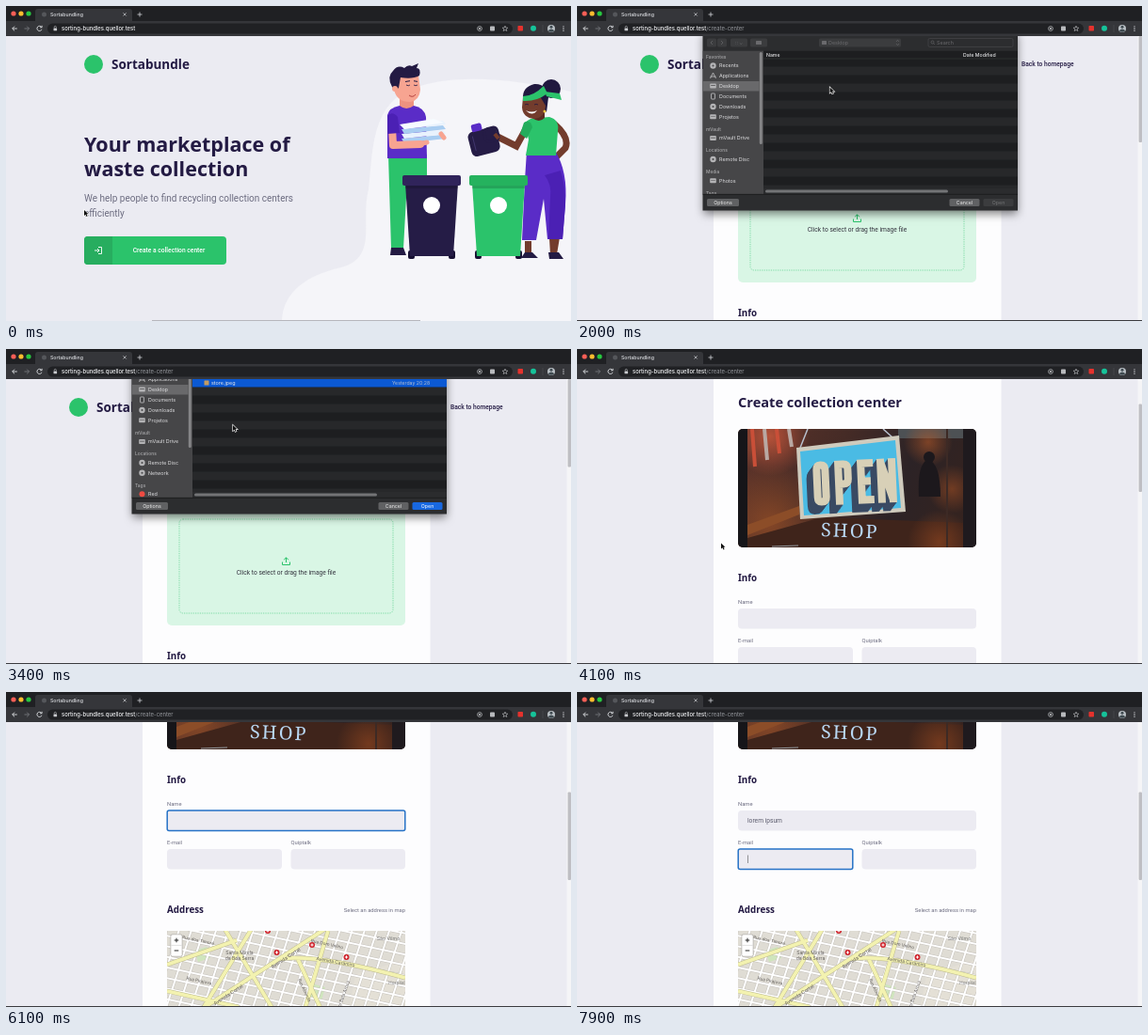
Animation, 600 px wide and 335 px high, one loop 8 s. Source, as an HTML page with a canvas:

```html
<!DOCTYPE html>
<html lang="en">
<head>
<meta charset="utf-8">
<title>Collection center demo</title>
<style>
html, body { margin: 0; width: 100%; height: 100%; overflow: hidden; background: #ebebf2; }
canvas { display: block; width: 600px; height: 335px; }
</style>
</head>
<body>
<canvas id="stage"></canvas>
<script>
const W = 600, H = 335, LOOP = 8000, STEP = 100;
const canvas = document.getElementById('stage');
const c = canvas.getContext('2d');
const dpr = Math.max(1, window.devicePixelRatio || 1);
canvas.width = W * dpr;
canvas.height = H * dpr;

const HEAD = '"Noto Sans", "Open Sans", sans-serif';
const BODY = 'Roboto, sans-serif';
const UI = 'Inter, sans-serif';
const INK = '#231a43', GREEN = '#2bc36b', BG = '#ebebf2', FIELD = '#ecebf2';
const SITE = 'sorting-bundles.quellor.test';

function text(s, x, y, size, color, font = BODY, weight = 400, align = 'left') {
  c.font = `${weight} ${size}px ${font}`;
  c.fillStyle = color;
  c.textAlign = align;
  c.fillText(s, x, y + size * 0.35);
}
function tilted(s, x, y, size, color, deg) {
  c.save();
  c.translate(x, y);
  c.rotate(deg * Math.PI / 180);
  text(s, 0, 0, size, color, UI, 400, 'center');
  c.restore();
}
function rect(x, y, w, h, color, r = 0) {
  c.fillStyle = color;
  c.beginPath();
  c.roundRect(x, y, w, h, r);
  c.fill();
}
function frame(x, y, w, h, color, r, width) {
  c.strokeStyle = color;
  c.lineWidth = width;
  c.beginPath();
  c.roundRect(x, y, w, h, r);
  c.stroke();
}
function dot(x, y, r, color) {
  c.fillStyle = color;
  c.beginPath();
  c.arc(x, y, r, 0, 7);
  c.fill();
}
function glow(x, y, r, rgb, alpha) {
  const g = c.createRadialGradient(x, y, 0, x, y, r);
  g.addColorStop(0, `rgba(${rgb},${alpha})`);
  g.addColorStop(1, `rgba(${rgb},0)`);
  dot(x, y, r, g);
}
function fill(d, color) {
  c.fillStyle = color;
  c.fill(new Path2D(d));
}
function line(d, color, width = 0.8) {
  c.strokeStyle = color;
  c.lineWidth = width;
  c.stroke(new Path2D(d));
}
// Piecewise linear track: rows of [time, ...values]
function track(t, keys) {
  let i = 0;
  while (i < keys.length - 1 && keys[i + 1][0] <= t) i++;
  const a = keys[i], b = keys[i + 1];
  if (!b || t <= a[0]) return a.slice(1);
  const k = (t - a[0]) / (b[0] - a[0]);
  return a.slice(1).map((v, j) => v + (b[j + 1] - v) * k);
}

function browser(path) {
  rect(0, 0, W, 17, '#1f2023');
  rect(31, 3, 103, 16, '#35363a', 3);
  rect(0, 16, W, 16, '#35363a');
  ['#fe5f57', '#febc2e', '#28c840'].forEach((col, i) => dot(8 + i * 8, 8, 2.6, col));
  dot(40.5, 9, 2.5, '#55575b');
  text('Sortabundling', 47, 8.7, 5.2, '#dfe1e5', UI, 500);
  line('M124.5 7.3 l3.2 3.2 m0 -3.2 l-3.2 3.2', '#d4d6da', 0.7);
  line('M139.5 9 h5 m-2.5 -2.5 v5', '#d4d6da', 0.8);
  line('M11.8 24 h-5 m2.3 -2.4 l-2.4 2.4 l2.4 2.4', '#dfe1e5', 0.9);
  line('M19.5 24 h5 m-2.3 -2.4 l2.4 2.4 l-2.4 2.4', '#75777b', 0.9);
  line('M37.7 22.4 a2.6 2.6 0 1 0 .3 2.4 m.1 -4 v2 h-2', '#dfe1e5', 0.9);
  rect(44, 18.6, 494, 11, '#202124', 5.5);
  rect(50.5, 23.4, 3.6, 2.9, '#c8cacd', 0.5);
  line('M51.2 23.5 v-1 a1.1 1.1 0 0 1 2.2 0 v1', '#c8cacd', 0.6);
  text(SITE, 59, 23.8, 5.9, '#f1f2f4', UI, 500);
  if (path) text(path, 59 + c.measureText(SITE).width, 23.8, 5.9, '#96999e', UI);
  line('M500.6 24 a2.4 2.4 0 1 0 4.8 0 a2.4 2.4 0 1 0 -4.8 0', '#c8cacd', 0.7);
  dot(503, 24, 1, '#c8cacd');
  rect(514, 21.5, 5, 5, '#b8babd', 0.8);
  line('M530 21.2 l.8 1.9 2 .1 -1.5 1.3 .5 2 -1.8 -1.1 -1.8 1.1 .5 -2 -1.5 -1.3 2 -.1Z', '#c8cacd', 0.6);
  rect(543.5, 21, 5.5, 5.5, '#e5322d', 0.8);
  dot(560, 23.8, 3, '#16c39a');
  line('M570 20 v8', '#55575b', 0.5);
  dot(579, 24, 4, '#b9bfc4');
  fill('M575.7 26.2 Q579 22.6 582.3 26.2 Q579 29.4 575.7 26.2', '#3f4a50');
  dot(579, 22.3, 1.5, '#3f4a50');
  for (const y of [21.8, 24, 26.2]) dot(592, y, 0.65, '#dfe1e5');
}

function brand(x) {
  dot(x, 62, 10, GREEN);
  text('Sortabundle', x + 19, 62, 13.5, INK, HEAD, 700);
}

function bin(x, body, lid) {
  rect(x + 6, 260, 7, 9, '#171033', 2);
  rect(x + 49, 260, 7, 9, '#171033', 2);
  fill(`M${x + 3} 188 H${x + 59} L${x + 54} 266 H${x + 8}Z`, body);
  fill(`M${x + 3} 190 H${x + 59} V194 H${x + 3}Z`, 'rgba(0,0,0,.16)');
  rect(x, 180, 62, 11, lid, 2);
  dot(x + 31, 212, 9, '#fff');
}

function man() {
  const skin = '#f7a491', purple = '#5a2cc7';
  fill('M406 158 H447 V186 H426 L422 258 H409Z', GREEN);
  fill('M409 257 H422 L425 265 H408Z', INK);
  fill('M405 116 Q407 108 418 106 H433 Q444 108 446 118 L447 162 H405Z', purple);
  fill('M418 94 H433 V106 Q425 112 418 106Z', '#ee9280');
  fill('M412 78 Q413 71 426 72 L438 74 L440 89 Q439 101 429 102 Q415 102 412 89Z', skin);
  fill('M410 86 Q404 75 411 69 Q416 62 423 66 Q427 62 431 64 L438 61 L436 66 Q441 66 439 74 Q432 78 419 76 L417 87 L413 90Z', INK);
  dot(413, 88, 3, skin);
  line('M425 84 q2.5 1.5 4 0 M433 84 q2 1.5 4 0', INK, 0.8);
  line('M424 80.5 l5 -.8 M433 79.7 l4 .7', INK, 1);
  line('M428 95 q4 3 7 -1', '#b3403e', 1);
  for (let i = 0; i < 4; i++)
    fill(`M420 ${141 - i * 5} L464 ${137 - i * 5} L467 ${141 - i * 5} L423 ${146 - i * 5}Z`, i % 2 ? '#e8f2fd' : '#a9cdf1');
  fill('M418 126 L454 120 L465 124 L423 131Z', '#f7fbff');
  c.lineCap = c.lineJoin = 'round';
  line('M410 129 L411 148 L440 147', skin, 8);
  line('M438 147 l9 -2 M462 136 l3 4', skin, 5);
  c.lineCap = 'butt';
  c.lineJoin = 'miter';
  fill('M405 117 Q410 111 416 118 L418 135 L405 136Z', '#4b20b4');
}

function woman() {
  const skin = '#733c2d', purple = '#5a2cc7';
  line('M582 125 Q599 140 594 151 L583 162', skin, 7);
  fill('M577 247 L588 246 L585 264 H578Z M551 250 H558 L558 264 H551Z', skin);
  fill('M553 154 H583 Q597 176 594 211 L591 248 H575 L571 205 L563 249 H548 L551 185Z', purple);
  fill('M572 180 Q580 190 578 204 L576 248 H591 L594 211 Q594 190 589 175Z', '#4b20b4');
  fill('M576 262 H587 L592 269 H577Z M551 262 H559 L565 268 H547Z', INK);
  fill('M551 124 Q558 118 566 119 L577 118 Q588 121 586 133 L584 159 H552 L555 142Z', GREEN);
  fill('M559 108 H572 V119 Q566 125 559 119Z', '#5b2d22');
  dot(579, 88, 10, '#20183f');
  fill('M549 99 Q548 86 561 83 Q574 82 576 97 L574 113 L566 105Z', '#20183f');
  fill('M549 97 L567 96 L573 106 Q572 119 561 120 Q549 119 548 108Z', skin);
  fill('M549 96 Q560 96 571 85 L575 93 Q563 102 549 101Z', GREEN);
  fill('M572 91 L588 93 L590 100 L574 96Z', GREEN);
  line('M551 105 q2 -1.5 4 0 M561 105 q2 -1.5 4 0', '#20183f', 0.8);
  fill('M552 111 Q558 114 564 111 Q559 118 552 111', '#fff');
  dot(572, 112, 1.5, '#f4c542');
  c.lineCap = 'round';
  line('M553 129 L542 149 L522 139', skin, 7);
  c.lineCap = 'butt';
  fill('M550 124 Q557 120 559 129 L553 141 L546 136Z', '#23ad5c');
  c.save();
  c.translate(507, 144);
  c.rotate(-0.25);
  rect(-15, -13, 31, 27, '#251c46', 6);
  rect(-9, -20, 11, 8, purple, 2);
  frame(3, -12, 14, 14, '#251c46', 4, 3);
  line('M-10 -8 V8', '#41366d', 1);
  c.restore();
  line('M519 136 l4 5', skin, 4);
}

function home(t) {
  rect(0, 31, W, 304, BG);
  fill('M293 335 C294 303 321 286 356 278 C396 267 376 229 385 195 C390 159 386 106 431 88 C479 70 544 79 600 91 V335Z', '#f5f5f9');
  brand(93);
  text('Your marketplace of', 83, 147, 21.5, INK, HEAD, 700);
  text('waste collection', 83, 173, 21.5, INK, HEAD, 700);
  text('We help people to find recycling collection centers', 83, 204, 10, '#6c6c80');
  text('efficiently', 83, 220, 10, '#6c6c80');
  rect(83, 245, 151, 30, t >= 500 ? '#34cb79' : GREEN, 4);
  rect(83, 245, 30, 30, '#27ad5f', [4, 0, 0, 4]);
  line('M98 256.5 h3.5 v7 h-3.5 M94 260 h5 m-2 -2 l2 2 l-2 2', '#fff', 0.9);
  text('Create a collection center', 173, 260, 6.7, '#fff', BODY, 500, 'center');
  man();
  woman();
  bin(421, '#251c46', '#30245b');
  bin(492, GREEN, '#25b25e');
  rect(155, 334, 285, 1, '#b6b6bc');
}

function dropZone() {
  rect(171, 168, 253, 126, '#d9f6e5', 5);
  c.setLineDash([1.2, 1.2]);
  frame(184, 181, 227, 100, '#55cf89', 4, 0.7);
  c.setLineDash([]);
  line('M293.5 226.5 v3 h8 v-3 M297.5 227 v-5 m-2.4 2.2 l2.4 -2.4 l2.4 2.4', GREEN, 1);
  text('Click to select or drag the image file', 297.5, 238, 6.67, '#34343f', BODY, 400, 'center');
}

function photo() {
  c.save();
  c.beginPath();
  c.roundRect(171, 168, 253, 126, 5);
  c.clip();
  const g = c.createLinearGradient(181, 168, 414, 260);
  g.addColorStop(0, '#5c332a');
  g.addColorStop(0.4, '#452b26');
  g.addColorStop(0.7, '#2c2326');
  g.addColorStop(1, '#35231f');
  rect(171, 168, 253, 126, g);
  // Lights behind the glass
  glow(205, 176, 42, '214,92,62', 0.75);
  for (let i = 0; i < 4; i++) line(`M${186 + i * 13} 168 l3 ${40 - i * 7}`, i % 2 ? '#b9a8a2' : '#c94f38', 4);
  rect(341, 168, 73, 10, '#4d5154');
  glow(373, 182, 26, '190,92,40', 0.55);
  glow(398, 232, 26, '176,84,36', 0.5);
  fill('M363 240 Q361 205 373 200 Q386 205 386 240Z', '#1c181c');
  dot(374, 198, 6, '#1c181c');
  glow(205, 268, 62, '150,78,38', 0.75);
  fill('M181 270 L236 250 V259 L181 281Z', '#8c4d28');
  fill('M181 284 L260 262 L414 268 V294 H181Z', '#3f241b');
  glow(385, 288, 34, '150,72,32', 0.6);
  rect(171, 168, 10, 126, '#161519');
  rect(410, 168, 14, 126, '#1f1a1e');
  rect(392, 168, 2, 126, '#3d2a25');
  line('M237 188 L245 168 M335 177 L325 168', '#b8c0cd', 1.5);
  fill('M233 188 L342 175 L349 256 L237 264Z', '#cfcbbd');
  fill('M237 192 L338 180 L344 252 L241 260Z', '#4abbe4');
  // Block lettering with a long shadow
  c.save();
  c.translate(249, 203);
  c.rotate(-0.045);
  const word = 'M5 9 Q5 4 9 4 Q14 4 14 9 V38 Q14 43 9 43 Q5 43 5 38Z '
    + 'M28 47 V4 H33 Q38 4 38 9 V20 Q38 25 33 25 H28 '
    + 'M65 4 H52 V43 H65 M52 23 H62 M73 47 V0 M73 3 L85 44 M85 47 V0';
  for (let i = 9; i >= 0; i--) {
    c.save();
    c.translate(-i * 0.8, i);
    line(word, i ? '#3a4a63' : '#d8d0b7', 8);
    c.restore();
  }
  c.restore();
  c.save();
  c.translate(259, 275);
  c.rotate(0.04);
  c.letterSpacing = '2px';
  text('SHOP', 0, 0, 20, '#b9d8f4', '"Noto Serif", serif');
  c.letterSpacing = '0px';
  c.restore();
  line('M207 293 L235 292', '#a7b5bd', 0.8);
  c.restore();
}

function streets(deg, gap, color, width) {
  c.save();
  c.translate(300, 300);
  c.rotate(deg * Math.PI / 180);
  for (let y = -200; y < 200; y += gap) line(`M-220 ${y} H220`, color, width);
  c.restore();
}

function map() {
  c.save();
  c.beginPath();
  c.rect(171, 254, 253, 150);
  c.clip();
  rect(171, 254, 253, 150, '#dfdcd4');
  fill('M371 300 L424 285 V335 H365Z', '#e4e0d6');
  fill('M200 275 l13 -4 l4 12 l-13 4Z M321 309 l18 5 l-4 14 l-17 -5Z', '#cfe5bd');
  for (const [col, w] of [['#c2beb8', 2.9], ['#fff', 2]]) {
    streets(12, 11, col, w);
    streets(-72, 12.5, col, w);
  }
  const roads = 'M196 345 L342 250 M231 250 L288 345 M171 290 L245 264 M262 250 L204 345 '
    + 'M290 284 Q330 278 424 304 M171 318 L247 335 M342 254 L318 335 M309 282 L338 345';
  line(roads, '#bcb98f', 4.6);
  line(roads, '#f3f2b0', 3.7);
  const label = '#5f5b58';
  tilted('Avenida Cortal', 297, 283, 5.2, label, -33);
  tilted('Avenida Cortal', 236, 322, 5.2, label, -33);
  tilted('Avenida Caramiro', 350, 287, 5, label, 10);
  tilted('Rua Dom Velino', 341, 268, 4.7, label, 12);
  tilted('Rua dos Timoré', 204, 264, 4.7, label, 12);
  tilted('Rua Bela Arnoz', 358, 323, 4.7, label, -70);
  tilted('Rua Pirajuva', 205, 307, 4.7, label, 12);
  tilted('Rua Alminda', 317, 317, 4.5, label, 65);
  tilted('Santa Mirela', 248, 277, 5, label, 0);
  tilted('da Boa Serra', 248, 283, 5, label, 0);
  tilted('São Vilmo', 406, 262, 5.2, '#777', 0);
  tilted('Hospital', 415, 309, 4.5, '#777', 0);
  for (const [x, y] of [[278, 254], [325, 269], [287.5, 277], [361.5, 282]]) {
    dot(x, y, 3, '#cf2029');
    line(`M${x - 1.6} ${y} h3.2 m-1.6 -1.6 v3.2`, '#fff', 1);
  }
  rect(174.5, 257.5, 13, 24, '#b8b6b2', 2);
  rect(175.3, 258.2, 11.4, 22.5, '#fff', 1.5);
  line('M175.3 269.4 h11.4', '#ccc', 0.6);
  line('M178.7 264 h4.6 m-2.3 -2.3 v4.6 M178.7 275 h4.6', '#222', 1);
  c.restore();
}

function input(label, x, y, w, focus, value, caret) {
  text(label, x, y - 7, 5.83, '#6c6c80');
  rect(x, y, w, 21.5, FIELD, 4);
  if (focus) frame(x + 0.2, y, w - 0.4, 21.5, '#2672c6', 2, 1.5);
  text(value, x + 10, y + 10.5, 6.67, '#5f5f70');
  if (caret) rect(x + 10 + c.measureText(value).width + 0.3, y + 6.5, 0.6, 8.5, '#555');
}

function center(t) {
  const [scroll] = track(t, [[3800, 0], [4100, 83], [4400, 166], [4700, 227], [4900, 233]]);
  rect(0, 31, W, 304, BG);
  c.save();
  c.translate(0, -scroll);
  brand(77);
  text('Back to homepage', 472, 62, 6.67, INK, BODY, 500);
  rect(145, 101, 305.5, 650, '#fdfdfe', 3);
  text('Create collection center', 171, 140, 14.6, INK, HEAD, 700);
  if (t >= 3700) photo(); else dropZone();
  text('Info', 171, 326.8, 9.8, INK, HEAD, 700);
  const count = Math.floor(Math.max(0, Math.min(11, (t - 6200) / 100)));
  const onName = t >= 5700 && t < 7600, onMail = t >= 7600;
  const blink = Math.floor((t - 5600) / 500) % 2 === 0;
  input('Name', 171, 359, 253, onName, 'lorem ipsum'.slice(0, count), onName && (count > 0 || blink && t < 6100));
  input('E-mail', 171, 400, 122, onMail, '', onMail);
  input('Quiptalk', 302.5, 400, 121.5, false, '', false);
  text('Address', 171, 464.8, 9.8, INK, HEAD, 700);
  text('Select an address in map', 424, 464.5, 5.83, '#6c6c80', BODY, 400, 'right');
  c.translate(0, 233);
  map();
  c.restore();
  rect(595.5, 31, 4.5, 304, '#f5f5f7');
  rect(596.6, 32 + scroll * 0.32, 3.4, t < 2600 ? 113 : 93.5, '#bebec3', 1);
  rect(0, 334, W, 1, '#3a3a3e');
}

function icon(kind, x, y) {
  const col = '#b4b4b6';
  if (kind === 'dot') { dot(x, y, 3.2, col); dot(x, y, 1, '#48484a'); }
  else if (kind === 'red') dot(x, y, 3, '#ee4b42');
  else if (kind === 'apps') line(`M${x - 3} ${y + 3} l3 -6 l3 6 M${x - 3} ${y + 1} h6`, col, 0.9);
  else if (kind === 'page') frame(x - 2, y - 3, 4, 6, col, 0.5, 0.9);
  else { rect(x - 3.3, y - 2.4, 6.6, 5, col, 0.8); rect(x - 2.3, y - 0.8, 4.6, 0.7, '#48484a'); }
}

function button(s, x, w, color, ink) {
  rect(x, 205, w, 8, color, 1.5);
  text(s, x + w / 2, 209.2, 5.3, ink, UI, 400, 'center');
}

function dialog(t) {
  const [up] = track(t, [[1400, 190], [1500, 187], [1600, 110], [1700, 30], [1800, 0],
    [3300, 0], [3400, 42], [3500, 130], [3600, 190]]);
  if (up >= 188) return;
  const ready = t >= 2300, picked = t >= 2600, dim = ready ? '#c6c6c8' : '#6a6a6d';
  c.save();
  c.beginPath();
  c.rect(0, 31, W, 304);
  c.clip();
  c.translate(0, -up);
  c.shadowColor = 'rgba(0,0,0,.5)';
  c.shadowBlur = 9 * dpr;
  c.shadowOffsetY = 3 * dpr;
  rect(133.5, 28, 334.5, 189.5, '#2c2d2f');
  c.shadowColor = 'transparent';
  rect(138, 34.5, 10, 9, '#3b3c3e', 1.5);
  rect(149, 34.5, 10, 9, '#3b3c3e', 1.5);
  line('M144 37 l-2 2 l2 2 M153 37 l2 2 l-2 2', dim, 0.7);
  rect(163, 34.5, 18, 9, '#3b3c3e', 1.5);
  text('∷ ⌄', 172, 39, 5, dim, UI, 400, 'center');
  rect(184, 34.5, 18, 9, '#3b3c3e', 1.5);
  rect(190, 37, 6, 4, dim, 0.6);
  rect(257, 34.5, 87, 9, '#3b3c3e', 1.5);
  rect(260, 37, 5, 4, dim, 0.6);
  text('Desktop', 267, 39, 5.4, dim, UI);
  line('M339 38 l1.5 -1.8 l1.5 1.8 M339 40 l1.5 1.8 l1.5 -1.8', dim, 0.6);
  frame(373, 34.5, 90, 9, '#4a4b4d', 1.5, 0.6);
  line('M376 38.5 a1.5 1.5 0 1 1 3 0 a1.5 1.5 0 1 1 -3 0 M378.6 39.7 l1.3 1.3', dim, 0.6);
  text('Search', 382, 39, 5.4, dim, UI);

  c.save();
  c.beginPath();
  c.rect(133.5, 47.5, 334.5, 152.5);
  c.clip();
  rect(133.5, 47.5, 64.5, 153, '#464648');
  const head = (s, y) => text(s, 137, y, 4.9, '#a7a7a9', UI, 500);
  const item = (kind, s, y) => { icon(kind, 144.5, y); text(s, 151, y, 5.4, '#dedee0', UI); };
  rect(133.5, 80, 60, 10.5, '#69696b');
  head('Favorites', 54);
  item('dot', 'Recents', 63.5);
  item('apps', 'Applications', 74);
  item('box', 'Desktop', 85);
  item('page', 'Documents', 96);
  item('dot', 'Downloads', 107);
  item('box', 'Projetos', 117.7);
  head('mVault', 131);
  item('box', 'mVault Drive', 140.5);
  head('Locations', 153.5);
  item('dot', 'Remote Disc', 163);
  if (ready) {
    item('dot', 'Network', 173.8);
    head('Tags', 187);
    item('red', 'Red', 196.3);
  } else {
    head('Media', 176);
    item('box', 'Photos', 185.7);
    head('Tags', 198.8);
  }
  rect(193.8, 49, 3, 98, '#858587', 1.5);
  rect(198, 47.5, 270, 153, '#1d1e20');
  for (let i = 1; i < 16; i += 2) rect(198, 55.5 + i * 9, 270, 9, '#27282a');
  text('Name', 201, 52, 5.2, '#e4e4e6', UI, 500);
  text('Date Modified', 410, 52, 5.2, '#e4e4e6', UI, 500);
  line('M198 56 H468', '#3b3c3e', 0.5);
  if (ready) ['notes.pdf', 'picture.png', 'store.jpeg'].forEach((name, i) => {
    const y = 60 + i * 9;
    if (picked && i === 2) rect(198, y - 4.5, 270, 9, '#0b59d3');
    rect(210.5, y - 2.5, 5, 5, i === 2 ? '#c39b62' : '#c8c8ca', 0.5);
    text(name, 218, y, 5.4, '#e8e8ea', UI);
    text('Yesterday 20:28', 410, y, 5.2, '#b4bfd2', UI);
  });
  rect(198, 194, 270, 6.5, '#2b2c2e');
  rect(200, 195.5, 194, 3, '#737476', 1.5);
  c.restore();

  line('M133.5 200.3 H468', '#111', 0.6);
  button('Options', 138, 34, '#606163', '#eee');
  button('Cancel', 395.5, 32, '#606163', '#eee');
  button('Open', 431.5, 32, picked ? '#1868e0' : '#3b3c3e', picked ? '#fff' : '#747577');
  c.restore();
}

function pointer(t) {
  if (t >= 5900) return;
  const [x, y] = track(t, [[0, 83, 217], [500, 150, 258], [900, 150, 258], [1300, 285, 225],
    [1600, 285, 225], [2000, 268.5, 86.5], [2500, 230, 77], [2900, 230, 77], [3200, 241, 81],
    [3500, 241, 81], [4000, 153, 206.5], [5000, 153, 206.5], [5500, 240, 137]]);
  c.save();
  c.translate(x, y);
  if (t >= 5500) line('M-1.5 -4 h3 M0 -4 v8 M-1.5 4 h3', '#222', 0.8);
  else {
    const arrow = 'M0 0 V6 L1.5 4.7 L2.5 7 L3.6 6.5 L2.6 4.3 H4.5Z';
    line(arrow, '#fff', 1.2);
    fill(arrow, '#111');
  }
  c.restore();
}

function draw(now) {
  const t = Math.floor((now % LOOP) / STEP) * STEP;
  const onHome = t < 900;
  c.setTransform(dpr, 0, 0, dpr, 0, 0);
  c.clearRect(0, 0, W, H);
  if (onHome) home(t);
  else {
    center(t);
    dialog(t);
  }
  browser(onHome ? '' : '/create-center');
  pointer(t);
}

let start;
function tick(now) {
  start ??= now;
  draw(now - start);
  requestAnimationFrame(tick);
}
draw(0);
requestAnimationFrame(tick);
</script>
</body>
</html>
```
